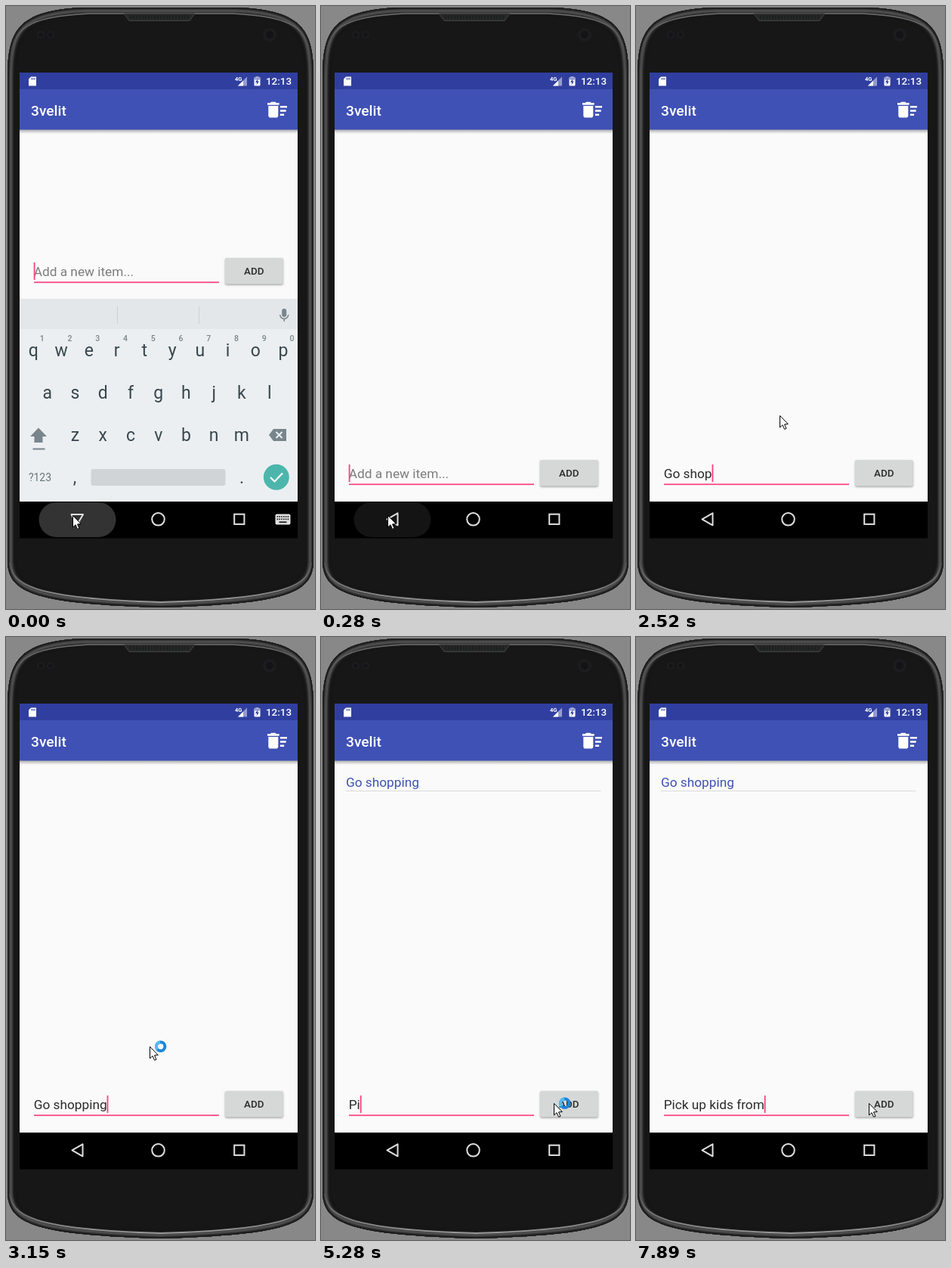
Write an HTML page with a canvas that moves like this. It is 409 px wide and 797 px high and loops after 8 s.

```html
<!DOCTYPE html>
<html lang="en">
<head>
<meta charset="utf-8">
<title>To-do list on a phone</title>
<style>
html, body { margin: 0; width: 100%; height: 100%; overflow: hidden; background: #888; }
canvas { display: block; width: 409px; height: 797px; }
</style>
</head>
<body>
<canvas id="stage" width="409" height="797"></canvas>
<script>
const c = document.getElementById('stage').getContext('2d');
const LOOP = 8000, ADDED = 4270;
const PINK = '#ff4081', KEY = '#37474f', GREY = '#78858c', NAV = '#e0e0e0';
const SIZE = 17.25;

const clamp = p => Math.min(1, Math.max(0, p));
const mix = (a, b, p) => a + (b - a) * p;
const ease = p => p * p * (3 - 2 * p);
const within = (t, a, b) => t >= a && t < b;

// Part of the phrase typed at t; keys are [time, letters] points of the typing pace
function typed(phrase, t, keys) {
  const i = keys.findIndex(k => k[0] > t);
  if (i === 0) return '';
  if (i < 0) return phrase;
  const [[t0, n0], [t1, n1]] = [keys[i - 1], keys[i]];
  return phrase.slice(0, Math.floor(mix(n0, n1, (t - t0) / (t1 - t0)) + .01));
}

const entry = t => t < ADDED
  ? typed('Go shopping', t, [[1280, 1], [1940, 5], [2520, 7], [3150, 11]])
  : typed('Pick up kids from', t, [[5000, 1], [5550, 4], [6680, 9], [7890, 17]]);

const caretShown = t => !(within(t, 430, 1010) || within(t, 3580, ADDED) || within(t, 4720, 5000));

function pointer(t) {
  if (t < 730) return [88, 673];
  const p = ease(clamp((t - 3400) / 420));
  return [mix(190, 308, p), mix(541, 616, p)];
}

function rect(x, y, w, h, fill) {
  c.fillStyle = fill;
  c.fillRect(x, y, w, h);
}

function round(x, y, w, h, r, fill) {
  c.fillStyle = fill;
  c.beginPath();
  c.roundRect(x, y, w, h, r);
  c.fill();
}

function disc(x, y, r, fill) {
  c.fillStyle = fill;
  c.beginPath();
  c.arc(x, y, r, 0, 7);
  c.fill();
}

function ring(x, y, r, stroke, width, from = 0, to = 7) {
  c.strokeStyle = stroke;
  c.lineWidth = width;
  c.beginPath();
  c.arc(x, y, r, from, to);
  c.stroke();
}

function text(s, x, y, size, fill, weight = 400, align = 'left') {
  c.font = `${weight} ${size}px Roboto, "Noto Sans", sans-serif`;
  c.textAlign = align;
  c.fillStyle = fill;
  c.fillText(s, x, y);
}

function trace(path, stroke, width) {
  c.strokeStyle = stroke;
  c.lineWidth = width;
  c.stroke(new Path2D(path));
}

function shape(path, fill, x = 0, y = 0, scale = 1) {
  c.save();
  c.translate(x, y);
  c.scale(scale, scale);
  c.fillStyle = fill;
  c.fill(new Path2D(path));
  c.restore();
}

function fade(x0, y0, x1, y1, from, to) {
  const g = c.createLinearGradient(x0, y0, x1, y1);
  g.addColorStop(0, from);
  g.addColorStop(1, to);
  return g;
}

const SHELL = 'M2 95C2 34 14 5 105 2H304C395 5 407 34 407 95V735C405 776 372 790 205 795C38 790 4 776 2 735Z';
const TOP_RIM = 'M6 75C8 30 26 14 110 10H300C383 14 401 30 403 75';
const LOW_RIM = 'M5 736C8 764 32 783 205 788C378 783 401 764 404 736';
const SWEEP = 'M15 16h4v2h-4zm0-8h7v2h-7zm0 4h6v2h-6zM3 18c0 1.1.9 2 2 2h6c1.1 0 2-.9 2-2V8H3v10zM14 5h-3l-1-1H6L5 5H2v2h12z';
const SPEAKER = 'M156 10H250L243 19.5H163Z';

function phone() {
  rect(0, 0, 409, 797, '#888');
  shape(SHELL, '#171717');
  c.save();
  c.clip(new Path2D(SHELL));
  // Rounded edge: one light ridge a few pixels inside the outline
  for (let inset = 13; inset > 0; inset--) {
    const lum = 22 + 58 * Math.exp(-(((inset - 5) / 2.6) ** 2));
    trace(SHELL, `rgb(${lum},${lum},${lum})`, inset * 2);
  }
  c.restore();
  trace(TOP_RIM, fade(0, 10, 0, 75, '#707070', '#404040'), 1.4);
  trace(LOW_RIM, fade(0, 736, 0, 788, '#505050', '#999'), 1.8);
  shape(SPEAKER, '#262826');
  trace(SPEAKER, '#444', 1);
  for (let x = 164; x < 244; x += 4) rect(x, 12, 2, 5, '#1c1f1d');
  for (const [x, r] of [[46, 5], [59, 5], [349, 9]]) {
    disc(x, 38, r, '#1d1d1f');
    disc(x, 38, r * .55, '#141416');
  }
}

function statusBar() {
  const dim = '#949ccf', blue = '#303f9f';
  rect(18, 88, 368, 22, blue);
  shape('M33 93.5H40V105.5H30V96.5Z', '#fff');
  for (let x = 33.5; x < 38; x += 2) rect(x, 95, 1, 2.5, blue);
  shape('M319 93.5V105.5H307Z', dim);
  shape('M314 98.5V105.5H307Z', '#fff');
  text('4G', 303, 99, 7.5, '#fff', 700);
  rect(330.5, 93, 4, 2, dim);
  round(328.5, 94.5, 8, 11, 1, '#fff');
  rect(328.5, 94.5, 8, 3, dim);
  shape('M333.5 96L330 101H332.2L331.5 104.5L335 99.5H332.8Z', blue);
  text('12:13', 378, 104, 13.4, '#fff', 500, 'right');
}

function appScreen() {
  rect(18, 88, 368, 568, '#fafafa');
  rect(18, 163, 368, 6, fade(0, 163, 0, 169, 'rgba(0,0,0,.32)', 'rgba(0,0,0,0)'));
  rect(18, 110, 368, 53.5, '#3f51b5');
  statusBar();
  text('3velit', 33, 145, 19.2, '#fff', 500);
  shape(SWEEP, '#fff', 343.4, 121.6, 1.3);
}

function form(y, value, caret, pressed) {
  text(value || 'Add a new item...', 36.7, y + 18, SIZE, value ? '#2a2a2a' : '#7d7d7d');
  rect(37, y + 25.4, 245, 1.7, PINK);
  if (caret) rect(36.7 + c.measureText(value).width, y, 1.8, 23, PINK);
  c.save();
  c.shadowColor = 'rgba(0,0,0,.36)';
  c.shadowBlur = pressed ? 5 : 2.5;
  c.shadowOffsetY = pressed ? 2.5 : 1.2;
  round(290, y - 6, 76.7, 34.6, 2, pressed ? '#c3c4c4' : '#d6d7d7');
  c.restore();
  text('ADD', 328.2, y + 16, 13.4, '#2a2a2a', 500, 'center');
}

function list() {
  text('Go shopping', 33, 198, SIZE, '#3f51b5');
  rect(33, 203, 337.5, 1, '#dadada');
}

function keyboard() {
  const step = 36.75;
  rect(18, 387, 368, 40, '#e4e7e9');
  rect(18, 427, 368, 229, '#eceff1');
  rect(147, 397, 1, 23, '#cdd1d4');
  rect(255, 397, 1, 23, '#cdd1d4');
  round(365.2, 400, 6, 11, 3, GREY);
  ring(368.2, 408, 5.5, GREY, 1.5, 0, Math.PI);
  rect(367.4, 413, 1.6, 4, GREY);

  ['qwertyuiop', 'asdfghjkl', 'zxcvbnm'].forEach((row, r) => {
    const left = 201.7 - (row.length - 1) * step / 2;
    [...row].forEach((k, i) => {
      const x = left + i * step;
      text(k, x, 463 + r * 56, 23, KEY, 400, 'center');
      if (!r) text((i + 1) % 10, x + 11.5, 443, 10.5, GREY, 500, 'center');
    });
  });
  shape('M43 557.5L54 569H48.5V577H37.5V569H32Z', GREY);
  rect(35.5, 584.5, 16, 2, GREY);
  shape('M348 567L354 559H371V575H354Z', GREY);
  trace('M357.5 563l8 8m0-8l-8 8', '#eceff1', 2);
  text('?123', 45, 628, 14, '#66747b', 400, 'center');
  text(',', 91, 631, 23, KEY, 400, 'center');
  text('.', 312, 631, 23, KEY, 400, 'center');
  round(112.5, 612, 178, 22, 3, '#d0d4d7');
  disc(357.8, 622.8, 17, '#4db6ac');
  trace('M350 623L355.5 628.5L366 617.5', '#fff', 2.2);
}

function nav(t, open) {
  rect(18, 655, 368, 48.5, '#000');
  const glow = Math.round(mix(51, 20, clamp(t / 280)));
  if (t < 430) round(43.5, 656, 102, 46, 23, `rgb(${glow},${glow},${glow})`);
  c.lineJoin = 'round';
  trace(open ? 'M86.5 672H102L94.2 685.5Z' : 'M87.5 678.3L101.5 670.3V686.3Z', NAV, 2);
  c.lineJoin = 'miter';
  ring(201.5, 678.3, 8.3, NAV, 2);
  c.strokeRect(302.2, 671.7, 13.2, 13.2);
  if (!open) return;
  round(356.5, 671.5, 20, 14, 2, NAV);
  for (let x = 358.6; x < 374; x += 2.8) {
    rect(x, 674, 1.6, 1.8, '#222');
    rect(x, 677.4, 1.6, 1.8, '#222');
  }
  rect(361.5, 681.3, 10, 1.8, '#222');
}

function arrow(x, y, busy) {
  const path = 'M.5 .5V16L4 12.7L6.6 18.4L9 17.4L6.5 11.9L11.3 11.6Z';
  shape(path, '#fff', x, y);
  c.save();
  c.translate(x, y);
  trace(path, '#000', 1);
  if (busy) {
    ring(14.7, .2, 5.7, '#1b86dc', 4);
    ring(14.7, .2, 5.7, '#4fbdf2', 4, 2.4, 4.6);
  }
  c.restore();
}

function draw(t) {
  const open = t < 120;
  phone();
  appScreen();
  if (t >= ADDED) list();
  form(open ? 339 : 606, entry(t), caretShown(t), within(t, 4120, 4420));
  if (t < 280) {
    const gone = clamp((t - 120) / 160);
    c.save();
    c.globalAlpha = 1 - gone;
    c.translate(0, 60 * gone);
    keyboard();
    c.restore();
  }
  nav(t, open);
  arrow(...pointer(t), within(t, 2640, 5400));
}

function tick(now) {
  draw(now % LOOP);
  requestAnimationFrame(tick);
}
draw(0);
requestAnimationFrame(tick);
</script>
</body>
</html>
```
